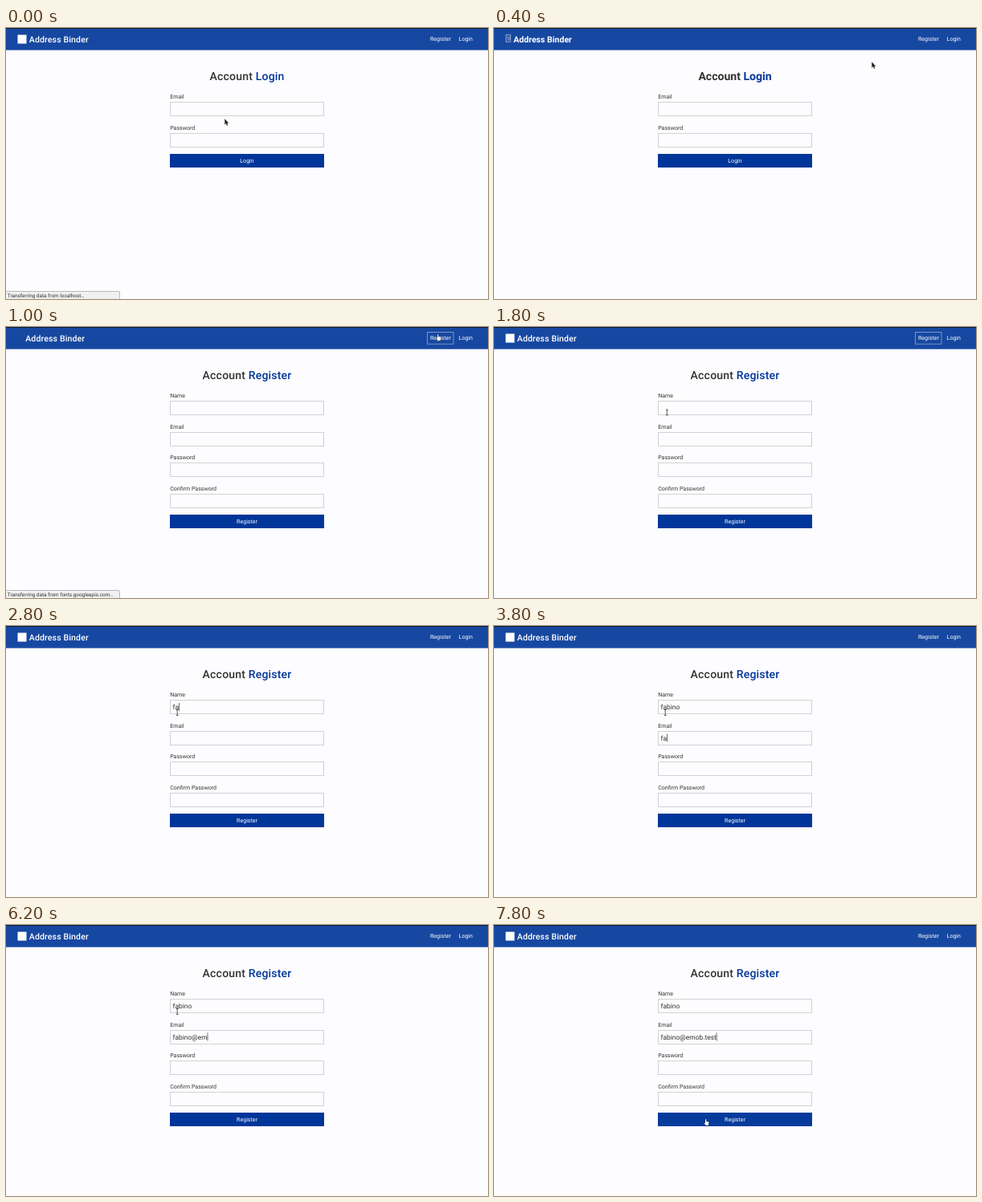
An HTML page with a canvas for the animation above (8000 ms loop, 600 by 338 pixels).

```html
<!DOCTYPE html>
<html lang="en">
<head>
<meta charset="utf-8">
<title>Account Register</title>
<style>
html, body { margin: 0; width: 100%; height: 100%; overflow: hidden; background: #fdfcfe; }
canvas { display: block; }
</style>
</head>
<body>
<canvas width="600" height="338"></canvas>
<script>
const ctx = document.querySelector('canvas').getContext('2d');
const LOOP = 8000, STEP = 200;
const BLUE = '#003699', INK = '#333';
const NAME = 'fabino', EMAIL = 'fabino@emob.test';

// [time, x, y, shape]
const POINTER = [
  [0, 272, 113, arrow], [200, 330, 96, arrow], [400, 470, 42, arrow],
  [600, 535, 10, hand], [800, 536, 9, hand], [1400, 440, 52, arrow],
  [1600, 262, 92, arrow], [1800, 215.3, 106.5, beam], [2000, 213.2, 108, beam],
  [7600, 236, 180, beam], [7800, 262, 242, hand]
];
// [time, characters typed]
const NAME_KEYS = [[0, 0], [2600, 1], [2800, 2], [3000, 4], [3200, 6]];
const EMAIL_KEYS = [
  [0, 0], [3600, 1], [3800, 2], [4200, 4], [5000, 5], [5200, 6], [5800, 7],
  [6200, 9], [6400, 10], [6600, 11], [6800, 13], [7000, 15], [7200, 16]
];
const CARET_OFF = [[4600, 5000], [5600, 5800]];

const at = (keys, t) => keys.filter(k => k[0] <= t).pop();
const within = (t, a, b) => t >= a && t < b;

function box(x, y, w, h, fill, stroke) {
  ctx.fillStyle = fill;
  ctx.fillRect(x, y, w, h);
  if (!stroke) return;
  ctx.strokeStyle = stroke;
  ctx.lineWidth = 1;
  ctx.strokeRect(x, y, w, h);
}

// Draws text and returns its right edge.
function text(str, x, y, size, color, weight = 400, spacing = 0) {
  ctx.font = `${weight} ${size}px Roboto, sans-serif`;
  ctx.letterSpacing = spacing + 'px';
  ctx.textRendering = 'geometricPrecision';
  ctx.fillStyle = color;
  ctx.fillText(str, x, y);
  return x + ctx.measureText(str).width;
}

function centered(str, x, y, size, color) {
  ctx.font = `400 ${size}px Roboto, sans-serif`;
  ctx.letterSpacing = '0px';
  text(str, x - ctx.measureText(str).width / 2, y, size, color);
}

function shape(x, y, path, fill, stroke) {
  const p = new Path2D(path);
  ctx.save();
  ctx.translate(x, y);
  ctx.strokeStyle = stroke;
  ctx.lineWidth = 0.8;
  ctx.lineJoin = 'round';
  ctx.stroke(p);
  ctx.fillStyle = fill;
  ctx.fill(p);
  ctx.restore();
}

function arrow(x, y) {
  shape(x, y, 'M.3 .3V7.6L1.9 6.1L3 8.7L4.2 8.2L3.1 5.7H5.2Z', '#222', '#eee');
}

function hand(x, y) {
  shape(x, y, 'M1 .5Q1.7 0 2.2 .6V3L5 3.6Q5.6 4 5.4 5L4.7 8H1.8L-.3 5.2Q0 4.2 1 5Z', '#fff', '#1b2740');
}

function beam(x, y) {
  shape(x, y, 'M-1.4 -3.4H1.4M-1.4 3.4H1.4M0 -3.4V3.4', '#333', '#333');
}

function header(fallback, icon, focused) {
  box(0, 0, 600, 27.6, '#1748a1');
  box(0, 0, 600, 1, '#101c33');
  if (fallback) {
    ctx.strokeStyle = '#c5d1e8';
    ctx.lineWidth = 0.7;
    ctx.strokeRect(15, 8.3, 5.6, 9);
    text('F4', 16, 12.5, 3.4, '#fff');
    text('7F', 16, 16.2, 3.4, '#fff');
  } else if (icon) {
    box(14.5, 8.5, 11, 11, '#fff');
  }
  text('Address Binder', icon ? 28.8 : 24.2, 17.7, 10.54, '#fff', fallback ? 700 : 500, fallback ? 0 : 0.13);
  text('Register', 528, 16.4, 7.05, '#fff');
  text('Login', 563.6, 16.4, 7.05, '#fff');
  if (focused) {
    ctx.strokeStyle = '#8fa8d4';
    ctx.lineWidth = 0.8;
    ctx.strokeRect(524.5, 6.5, 32.5, 14.7);
  }
}

function form(title, labels, fallback, hover) {
  const weight = fallback ? 700 : 500, spacing = fallback ? 0 : 0.17;
  ctx.font = `${weight} 14.05px Roboto, sans-serif`;
  ctx.letterSpacing = spacing + 'px';
  const left = 300 - ctx.measureText('Account ' + title).width / 2;
  const mid = text('Account ', left, 64.8, 14.05, INK, weight, spacing);
  text(title, mid, 64.8, 14.05, BLUE, weight, spacing);
  labels.forEach((label, i) => {
    const y = Math.round(38.6 * i);
    text(label, 204.2, 88.2 + 38.55 * i, 7.05, INK);
    box(204.5, 92.5 + y, 191, 17, '#fdfcfe', '#d2d1d4');
  });
  const y = labels.length === 2 ? 157 : 234;
  box(204, y, 192, 17, hover ? '#063b9c' : BLUE);
  centered(title, 300, y + 11.1, 7.05, '#fff');
}

function status(str, width) {
  ctx.beginPath();
  ctx.roundRect(-1, 328.5, width + 0.5, 12, 1.5);
  ctx.fillStyle = '#f1f0f1';
  ctx.fill();
  ctx.strokeStyle = '#b9b8ba';
  ctx.lineWidth = 1;
  ctx.stroke();
  text(str, 1.8, 335.5, 6.4, INK);
}

function draw(t) {
  const fallback = within(t, 200, 1000);
  const register = t >= 1000;
  box(0, 0, 600, 338, '#fdfcfe');
  header(fallback, t < 200 || t >= 1200, within(t, 1000, 2000));
  form(register ? 'Register' : 'Login',
    register ? ['Name', 'Email', 'Password', 'Confirm Password'] : ['Email', 'Password'],
    fallback, t >= 7800);

  if (t < 400) status('Transferring data from localhost…', 142);
  else if (within(t, 600, 1000)) status('localhost:3000/register', 71);
  else if (within(t, 1000, 1200)) status('Transferring data from fonts.googleapis.com…', 142);

  const nameEnd = text(NAME.slice(0, at(NAME_KEYS, t)[1]), 207.5, 104, 8.44, INK);
  const emailEnd = text(EMAIL.slice(0, at(EMAIL_KEYS, t)[1]), 207.5, 142.7, 8.44, INK);
  if (t >= 2000 && !CARET_OFF.some(([a, b]) => within(t, a, b))) {
    const inEmail = t >= 3400;
    box(inEmail ? emailEnd : nameEnd, inEmail ? 134.5 : 96, 0.7, 10, INK);
  }

  const [, x, y, pointer] = at(POINTER, t);
  pointer(x, y);
}

function tick() {
  const t = performance.now() % LOOP;
  draw(Math.floor(t / STEP) * STEP);
  requestAnimationFrame(tick);
}
tick();
</script>
</body>
</html>
```
